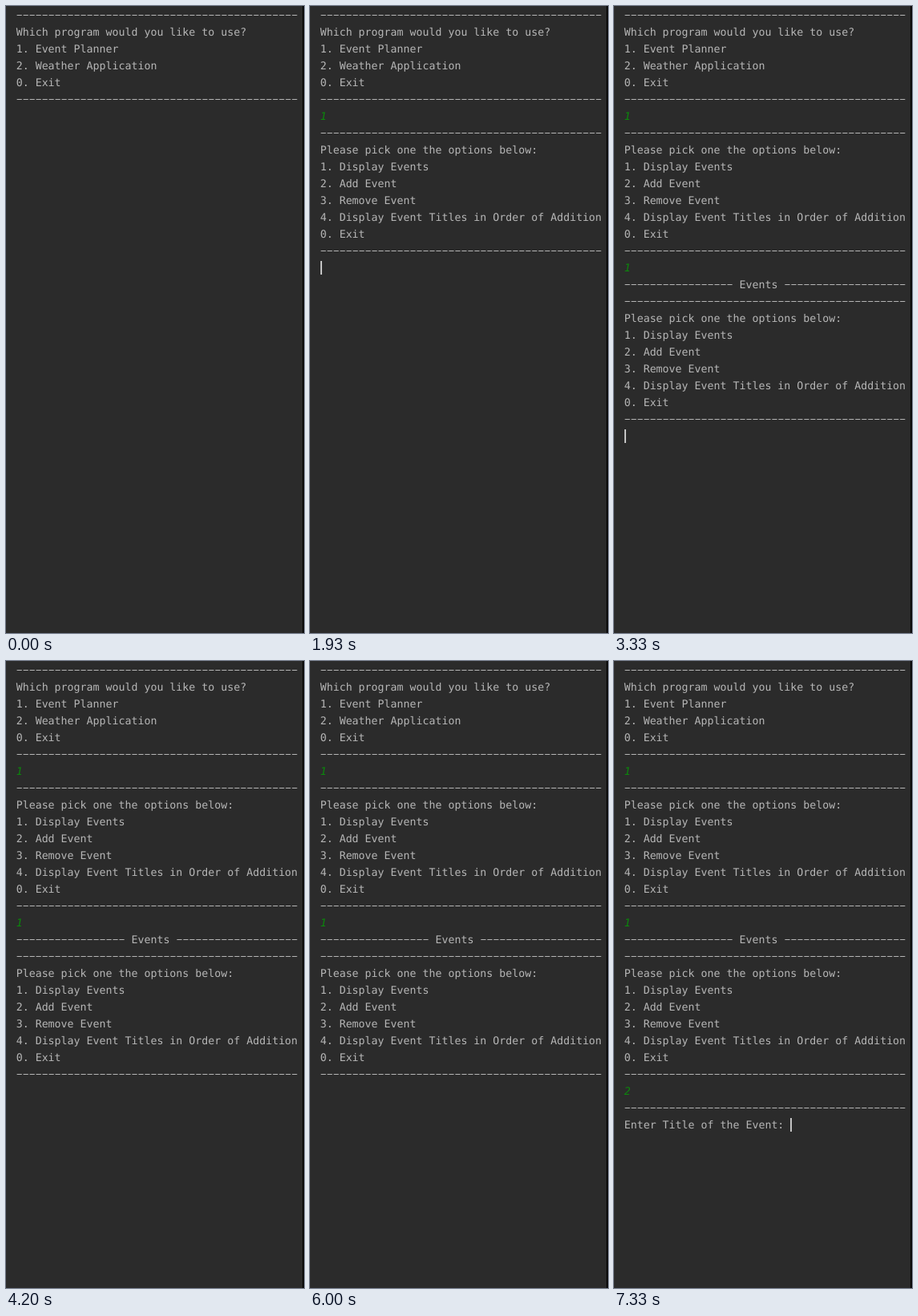
Write an HTML page that moves like this. It is 372 px wide and 782 px high and loops after 8 s.

```html
<!DOCTYPE html>
<html lang="en">
<head>
<meta charset="utf-8">
<title>Console menu</title>
<style>
html, body { margin: 0; width: 100%; height: 100%; overflow: hidden; background: #2b2b2b; }
svg { display: block; }
text {
  font: 13.27px "DejaVu Sans Mono", "Noto Sans Mono", monospace;
  text-rendering: geometricPrecision;
  fill: #b6b6b6;
}
.rule { stroke: #b6b6b6; stroke-width: 1.1; stroke-dasharray: 6.2 1.79; }
.input { font-style: italic; fill: #0c860c; }
</style>
</head>
<body>
<svg width="372" height="782" viewBox="0 0 372 782">
  <g id="console"></g>
  <rect id="caret" width="2" height="17" fill="#c4c4c4"/>
  <rect x="370" width="2" height="782" fill="#090909"/>
</svg>
<script>
const LOOP = 8000, FPS = 15, BLINK = 519;
const LEFT = 12.7, CHAR = 7.99, ROW = 21;
const output = document.getElementById("console");
const caret = document.getElementById("caret");

const dashes = n => "-".repeat(n);
const rule = dashes(44) + "\n";
const boxed = body => `${rule}${body}\n${rule}`;

const programs = boxed(`Which program would you like to use?
1. Event Planner
2. Weather Application
0. Exit`);
const options = boxed(`Please pick one the options below:
1. Display Events
2. Add Event
3. Remove Event
4. Display Event Titles in Order of Addition
0. Exit`);
const noEvents = `${dashes(17)} Events ${dashes(19)}\n`;

// Everything written to the console; each write restarts the caret blink.
const writes = [
  [-693, programs],
  [1467, "1"], [1667, "\n"], [1933, options],
  [2867, "1"], [3133, "\n"], [3333, noEvents + options], [3390, ""],
  [6933, "2"], [7133, "\n"], [7333, rule + "Enter Title of the Event: "]
];

function lineMarkup(line, row) {
  const style = /^\d$/.test(line) ? "input" : "";
  // Split into dash runs and words, each placed on the character grid.
  return [...line.matchAll(/-+|[^-]+/g)].map(({ 0: part, index }) => {
    const indent = part.length - part.trimStart().length;
    const x = LEFT + (index + indent) * CHAR;
    if (part[0] !== "-")
      return `<text class="${style}" x="${x}" y="${16 + row * ROW}">${part.trim()}</text>`;
    return `<path class="rule" d="M${x + 0.9} ${11.5 + row * ROW}h${part.length * CHAR - 1.79}"/>`;
  }).join("");
}

let shown;
function draw(now) {
  const t = Math.floor((now % LOOP + 5) * FPS / 1000) * 1000 / FPS + 1;
  const past = writes.filter(([start]) => start <= t);
  const content = past.map(([, text]) => text).join("");
  const lines = content.split("\n");
  const row = lines.length - 1;

  if (content !== shown) {
    output.innerHTML = lines.map(lineMarkup).join("");
    caret.setAttribute("x", Math.round(LEFT + lines[row].length * CHAR));
    caret.setAttribute("y", 3 + row * ROW);
    shown = content;
  }
  const idle = t - past[past.length - 1][0];
  caret.setAttribute("visibility", idle % (2 * BLINK) < BLINK ? "visible" : "hidden");
}

const origin = performance.now();
function tick() {
  draw(performance.now() - origin);
  requestAnimationFrame(tick);
}
tick();
</script>
</body>
</html>
```
